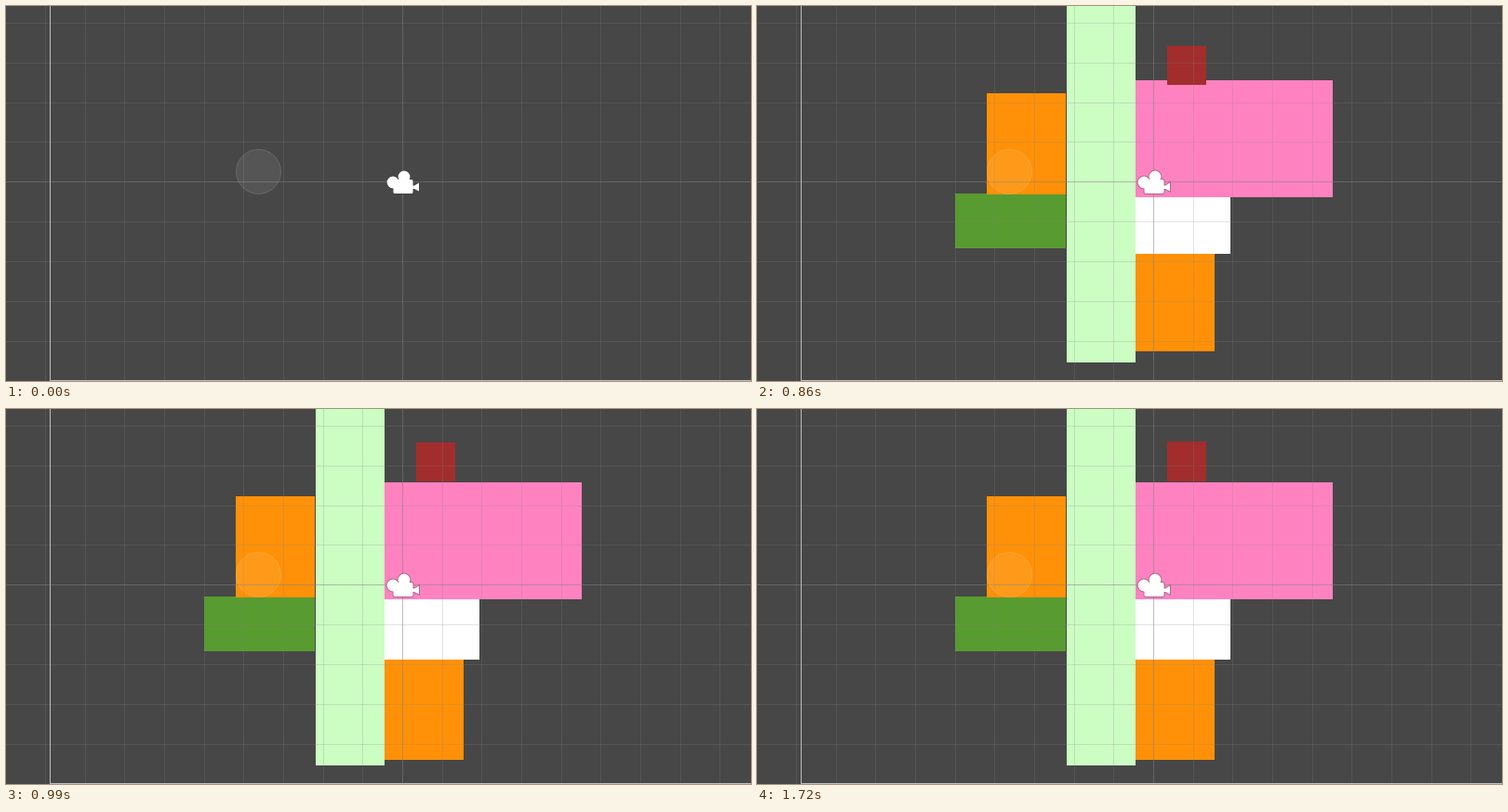
Recreate the animation shown at these times as an HTML page with a canvas. Size 801 by 404 pixels, loop 2.04 s.

```html
<!DOCTYPE html>
<html lang="en">
<meta charset="utf-8">
<title>Blocks separating</title>
<style>
html, body { margin: 0; height: 100%; overflow: hidden; background: #474747; }
canvas { display: block; }
</style>
<canvas width="801" height="404"></canvas>
<script>
const c = document.querySelector('canvas').getContext('2d');
const LOOP = 2040;
const ticks = [730, 860, 930, 990, 1230]; // the picture updates only at these times
const RATE = 0.0163;                      // decay of the remaining distance, per ms

// Back to front: colour, size, first place, settled place
const blocks = [
  ['#ccfdc3', [74, 384], [329, 0], [333, 0]],
  ['#589b30', [119, 59], [235, 198], [213, 202]],
  ['#ff9108', [85, 109], [267, 98], [247, 94]],
  ['#ff9108', [85, 108], [392, 219], [407, 270.4]],
  ['#ffffff', [102, 65], [402, 180], [407, 205]],
  ['#ff82c0', [211.6, 125.6], [390.6, 90.8], [407.4, 79]],
  ['#a22d2d', [42, 42.5], [441, 99], [441, 35]]
];

function fill(color, x, y, w, h) {
  c.fillStyle = color;
  c.fillRect(x, y, w, h);
}

function block([color, [w, h], from, to], age) {
  // Sideways moves settle sooner than vertical ones
  const [x, y] = [1.8, 1].map((pace, i) =>
    to[i] + (from[i] - to[i]) * Math.exp(-RATE * pace * age));
  const left = Math.round(x), top = Math.round(y);
  fill(color, left, top, Math.round(x + w) - left, Math.round(y + h) - top);
}

function grid() {
  const line = k => `rgba(128,128,128,${k ? 0.23 : 0.52})`;
  for (let k = -9; k <= 8; k++) fill(line(k), Math.floor(426.5 + k * 42.67), 0, 1, 404);
  for (let k = -4; k <= 4; k++) fill(line(k), 0, Math.floor(189.7 + k * 42.83), 801, 1);
  fill('#bdbdbd', 47, 0, 1, 404);
  fill('#bdbdbd', 47, 403, 754, 1);
}

function handle() {
  c.beginPath();
  c.arc(271.5, 178.5, 24, 0, 7);
  c.fillStyle = 'rgba(255,255,255,.075)';
  c.fill();
  c.strokeStyle = 'rgba(255,255,255,.14)';
  c.lineWidth = 1;
  c.stroke();
}

const icon = new Path2D();
for (const [x, y] of [[416, 190], [428, 184]]) {
  icon.moveTo(x + 6.4, y);
  icon.arc(x, y, 6.4, 0, 2 * Math.PI);
}
icon.roundRect(416.5, 187, 21, 15, 1.5);
icon.addPath(new Path2D('M436 193.5h3l5-3v9l-5-2.5h-3z'));

function camera() {
  c.strokeStyle = 'rgba(60,60,60,.4)';
  c.lineWidth = 2;
  c.stroke(icon);
  c.fillStyle = '#fff';
  c.fill(icon);
}

function draw(now) {
  const shown = ticks.filter(x => x <= now % LOOP).pop();
  fill('#474747', 0, 0, 801, 404);
  if (shown) blocks.forEach(b => block(b, shown - ticks[0]));
  grid();
  handle();
  camera();
}

const start = performance.now();
function frame() {
  draw(performance.now() - start);
  requestAnimationFrame(frame);
}
frame();
</script>
</html>
```
